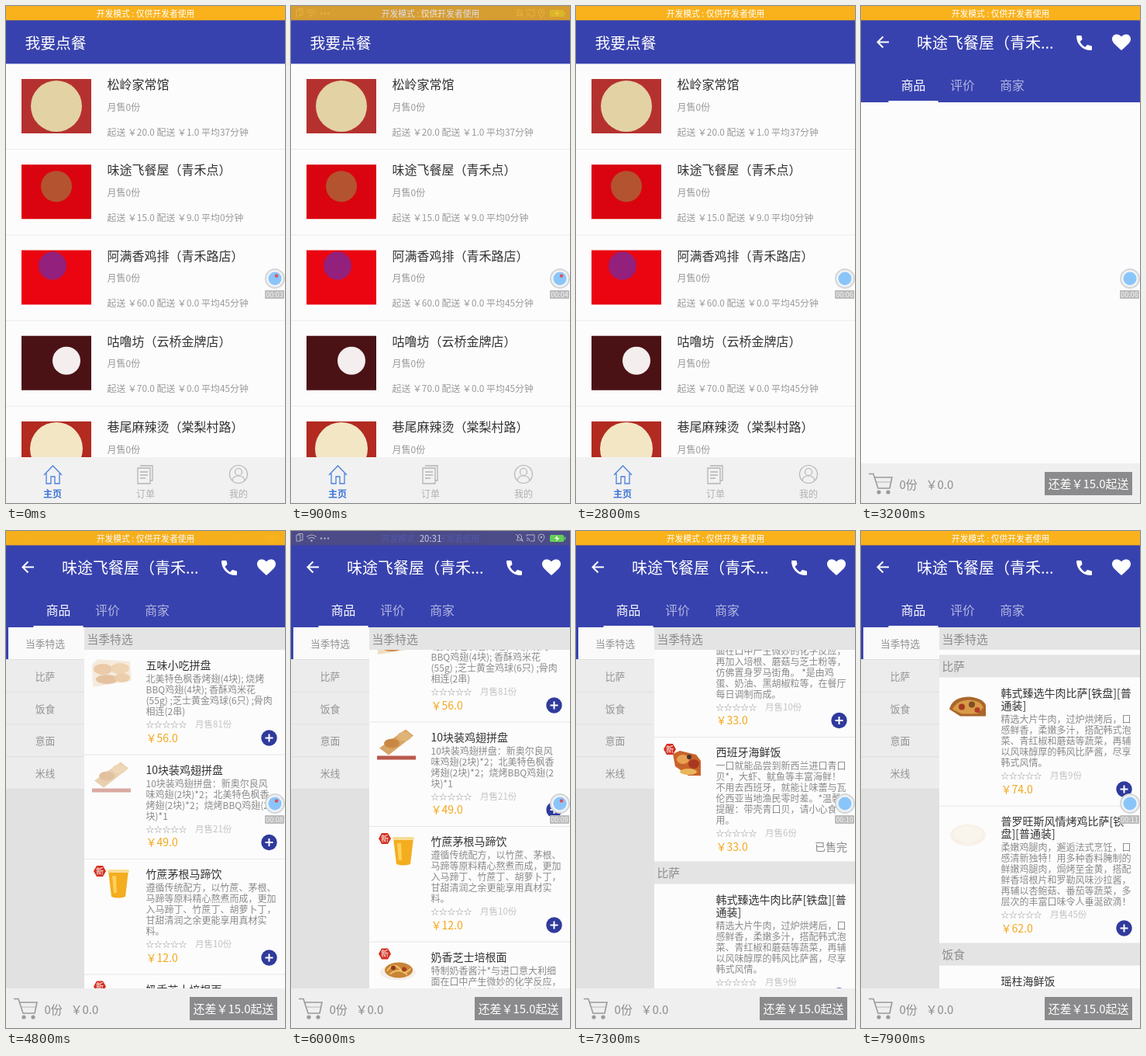
Write an HTML page that moves like this. It is 360 px wide and 640 px high and loops after 8000 ms.

```html
<!DOCTYPE html>
<html lang="zh-CN">
<head>
<meta charset="utf-8">
<style>
html, body { margin: 0; width: 100%; height: 100%; overflow: hidden; background: #fcfcfc; }
svg { display: block; width: 360px; height: 640px; }
text { font-family: "Noto Sans CJK SC", "Noto Sans CJK", "Noto Sans", sans-serif; white-space: pre; }
svg { font-weight: 350; }
</style>
</head>
<body>
<svg id="stage" viewBox="0 0 360 640"></svg>
<script>
const BLUE = '#3842ae', DARK = '#2f3a9c', ORANGE = '#f9b21b', PRICE = '#f3a71c';
const BAR = 18.4;

const rect = (x, y, w, h, fill, more = '') =>
  `<rect x="${x}" y="${y}" width="${w}" height="${h}" fill="${fill}" ${more}/>`;
const circle = (x, y, r, fill, more = '') =>
  `<circle cx="${x}" cy="${y}" r="${r}" fill="${fill}" ${more}/>`;
const oval = (x, y, rx, ry, fill) =>
  `<ellipse cx="${x}" cy="${y}" rx="${rx}" ry="${ry}" fill="${fill}"/>`;
const path = (d, fill, more = '') => `<path d="${d}" fill="${fill}" ${more}/>`;
const line = (d, color, w = 1) => path(d, 'none', `stroke="${color}" stroke-width="${w}"`);
// Text is placed by its left edge and vertical centre.
const text = (x, cy, size, str, fill, more = '') =>
  `<text x="${x}" y="${cy + size * .38}" font-size="${size}" fill="${fill}" ${more}>${str}</text>`;
const mid = (x, cy, size, str, fill, more = '') =>
  text(x, cy, size, str, fill, 'text-anchor="middle" ' + more);
const group = (id, body, more = '') => `<g id="${id}" ${more}>${body}</g>`;

// ---------- shop list ----------
// Name, minimum, fee, minutes, sign colour, then the plain mark: x, y, radius, colour.
const shops = [
  ['松岭家常馆', '20.0', '1.0', 37, '#b5312f', 45, 35, 33, '#e3d2a4'],
  ['味途飞餐屋（青禾点）', '15.0', '9.0', 0, '#d9040f', 45, 28, 20, '#b4532f'],
  ['阿满香鸡排（青禾路店）', '60.0', '0.0', 45, '#ea0510', 40, 20, 18, '#93207c'],
  ['咕噜坊（云桥金牌店）', '70.0', '0.0', 45, '#4b1216', 58, 32, 18, '#f4eeee'],
  ['巷尾麻辣烫（棠梨村路）', '20.0', '0.0', 45, '#b22a20', 45, 35, 34, '#f3e6c4'],
];

function shopRow([name, min, fee, mins, sign, x, cy, r, mark], i) {
  const y = 74 + i * 110.25;
  return rect(20, y + 20, 90, 70, sign) + circle(20 + x, y + 20 + cy, r, mark) +
    text(130.5, y + 27, 16, name, '#333') +
    text(130.5, y + 56, 12, '月售0份', '#999') +
    text(130.5, y + 88, 11.9, `起送 ￥${min} 配送 ￥${fee} 平均${mins}分钟`, '#999') +
    rect(0, y + 110, 360, 1, '#ebebeb');
}

const tabIcons =
  line('M49 604L60.5 592L72 604M52 602V615H58V606H63V615H69V602', '#4a80dd', 1.3) +
  line('M173 592H189V611H186M170 595H186V615H170ZM173 600H183M173 604H183M173 608H180', '#b4b4b4', 1.3) +
  circle(300, 603, 11.5, 'none', 'stroke="#b4b4b4" stroke-width="1.2"') +
  circle(300, 600, 4.5, 'none', 'stroke="#b4b4b4" stroke-width="1.2"') +
  line('M292 611Q293 605 300 605Q307 605 308 611', '#b4b4b4', 1.2);

const home = rect(0, 0, 360, 640, '#fcfcfc') + shops.map(shopRow).join('') +
  rect(0, 0, 360, BAR + 56, BLUE) + text(24.5, 47, 19.8, '我要点餐', '#fff') +
  rect(0, 581, 360, 59, '#f1f1f1') + tabIcons +
  mid(60, 628.5, 12, '主页', '#3c74d8', 'font-weight="700"') +
  mid(180, 628.5, 12, '订单', '#b0b0b0') + mid(300, 628.5, 12, '我的', '#b0b0b0');

// ---------- menu ----------
// Food pictures, drawn relative to the title line of a dish.
const noodles = (x, y) => oval(x, y, 23, 10, '#f3eee8') + oval(x + 1, y - 3, 18, 10, '#c88437') +
  line(`M${x - 14} ${y - 2}q8 -12 16 -3t14 0M${x - 10} ${y + 2}q10 -9 22 1`, '#f0c169', 2) +
  circle(x - 6, y - 6, 3, '#8f3a1e') + circle(x + 8, y - 4, 3, '#a3421f');
const photos = [
  path('M111 -1L118 -8L160 -5L162 20L112 28Z', '#f0dcc0') + oval(125, 5, 12, 7, '#d99a58') +
    oval(147, 4, 12, 7, '#e2ae6c') + oval(130, 18, 14, 6, '#cf8747') + oval(150, 16, 10, 6, '#dea25e'),
  path('M114 14L148 -10L158 -2L126 23Z', '#d8a565') + oval(130, 8, 10, 6, '#c98745') +
    oval(146, -1, 9, 6, '#e0b377') + rect(111, 24, 50, 5, '#b9594b'),
  path('M132 -5H158L154 29Q145 32 136 29Z', '#f4ad1f') + rect(131, -6, 28, 4, '#f8dc94', 'rx="2"') +
    path('M137 2H142L143 24H139Z', '#ffd05a'),
  noodles(138, 20),
  path('M125 2L134 -2L155 3L161 11V30H145L128 18Z', '#c9632c') + oval(138, 9, 8, 6, '#e9a050') +
    oval(152, 15, 7, 6, '#a83820') + oval(145, 25, 11, 4, '#eab65c') + circle(146, 6, 3, '#46352d'),
  path('M114 21Q118 5 140 5Q158 7 161 16V30H128Z', '#a9662b') +
    path('M118 21Q124 9 140 9Q155 10 158 19L150 27H130Z', '#d99a47') +
    circle(130, 18, 4, '#a53822') + circle(143, 15, 4, '#7d4d24') + circle(150, 22, 3.5, '#b33c25'),
  oval(138, 18, 23, 14, '#d09a55') + oval(138, 17, 18, 10, '#e7bc72'),
  '',
];
const badge = path('M113 -4L117 -11H125L129 -4L125 3H117Z', '#d32f20') +
  mid(121, -4, 10, '新', '#fff');

const dishes = [
  ['五味小吃拼盘', '北美特色枫香烤翅(4块); 烧烤|BBQ鸡翅(4块); 香酥鸡米花|(55g) ;芝士黄金鸡球(6只) ;骨肉|相连(2串)', 81, '56.0'],
  ['10块装鸡翅拼盘', '10块装鸡翅拼盘：新奥尔良风|味鸡翅(2块)*2；北美特色枫香|烤翅(2块)*2；烧烤BBQ鸡翅(2|块)*1', 21, '49.0'],
  ['竹蔗茅根马蹄饮', '遵循传统配方，以竹蔗、茅根、|马蹄等原料精心熬煮而成，更加|入马蹄丁、竹蔗丁、胡萝卜丁，|甘甜清润之余更能享用真材实|料。', 10, '12.0', 'new'],
  ['奶香芝士培根面', '特制奶香酱汁*与进口意大利细|面在口中产生微妙的化学反应，|再加入培根、蘑菇与芝士粉等，|仿佛置身罗马街角。 *是由鸡|蛋、奶油、黑胡椒粒等，在餐厅|每日调制而成。', 10, '33.0', 'new'],
  ['西班牙海鲜饭', '一口就能品尝到新西兰进口青口|贝*，大虾、鱿鱼等丰富海鲜！|不用去西班牙，就能让味蕾与瓦|伦西亚当地渔民零时差。*温馨|提醒：带壳青口贝，请小心食|用。', 6, '33.0', 'new sold', '比萨'],
  ['韩式臻选牛肉比萨[铁盘][普|通装]', '精选大片牛肉，过炉烘烤后，口|感鲜香，柔嫩多汁，搭配韩式泡|菜、青红椒和蘑菇等蔬菜，再辅|以风味醇厚的韩风比萨酱，尽享|韩式风情。', 9, '74.0'],
  ['普罗旺斯风情烤鸡比萨[铁|盘][普通装]', '柔嫩鸡腿肉，邂逅法式烹饪，口|感清新独特！用多种香料腌制的|鲜嫩鸡腿肉，焗烤至金黄，搭配|鲜香培根片和罗勒风味沙拉酱，|再辅以杏鲍菇、番茄等蔬菜，多|层次的丰富口味令人垂涎欲滴！', 45, '62.0', '', '饭食'],
  ['瑶柱海鲜饭', '', 12, '35.0'],
];

const section = (y, name) => rect(101, y, 259, 29, '#e4e4e4') + text(104.5, y + 15, 14.8, name, '#8c8c8c');

function dishList() {
  let y = 173, out = '';
  dishes.forEach(([title, desc, sales, price, flags = '', next], i) => {
    out += group('photo' + i, photos[i], `transform="translate(0 ${y})"`);
    if (flags.includes('new')) out += `<g transform="translate(0 ${y})">${badge}</g>`;
    title.split('|').forEach((s, k) => {
      if (k) y += 16.5;
      out += text(180.5, y, 14, s, '#333');
    });
    y += 3.5;
    for (const s of desc.split('|')) out += text(180.5, y += 14, 12, s, '#8a8a8a');
    y += 16.5;
    out += text(180.5, y, 10.6, '☆☆☆☆☆', '#999') + text(244, y, 11.5, `月售${sales}份`, '#c4c4c4');
    y += 17.5;
    out += text(180.5, y, 14, '￥' + price, PRICE, 'font-weight="500"');
    out += flags.includes('sold') ? text(308, y, 14, '已售完', '#8c8c8c')
      : circle(339.5, y, 10.2, DARK) + line(`M334.5 ${y}h10M339.5 ${y - 5}v10`, '#fff', 2);
    if (next) {
      out += section(y += 19, next);
      y += 49;
    } else {
      out += rect(101, y + 21, 259, 1, '#e8e8e8');
      y += 41;
    }
  });
  return out;
}

const sidebar = rect(0, 124, 101, 465, '#e1e1e1') + rect(0, 124, 101, 208, '#ececec') +
  rect(3, 124, 98, 41, '#fafafa') + rect(0, 124, 3, 41, BLUE) +
  ['当季特选', '比萨', '饭食', '意面', '米线'].map((s, i) =>
    mid(50.5, 145.5 + i * 41.7, 12.8, s, '#949494') +
    rect(0, 165 + i * 41.7, 101, 1, '#dfdfdf')).join('');

const cart = line('M10 602.5H16L22 621H37L40 607H18', '#9a9a9a', 1.6) +
  line('M20 613H38', '#b4b4b4') + circle(23, 626, 2.6, '#9a9a9a') + circle(35, 626, 2.6, '#9a9a9a');

const menuBody = `<g clip-path="url(#listArea)">${group('list', dishList())}</g>` +
  section(124, '当季特选') + sidebar;

const menu = rect(0, 0, 360, 640, '#fcfcfc') + group('menuBody', menuBody) +
  rect(0, 0, 360, 124, BLUE) +
  line('M36 46.5H22M28.5 39.5L21.5 46.5L28.5 53.5', '#fff', 2) +
  text(72, 47, 20, '味途飞餐屋（青禾...', '#fff') +
  path('M279 38H283.5Q284.5 38 284.7 39L285.5 43L282.5 46Q285 50.5 289 53L292 50L297 51.2Q298 51.5 298 52.5V56Q298 57 297 57Q288 57 283 51.5Q278 46 278 39Q278 38 279 38Z', '#fff') +
  path('M336 57L333 54.5C327 49 324 46.5 324 42.5C324 36 332 34.5 336 39.5C340 34.5 348 36 348 42.5C348 46.5 345 49 339 54.5Z', '#fff') +
  mid(67.5, 101.5, 15.8, '商品', '#fff', 'font-weight="500"') +
  mid(131, 101.5, 15.8, '评价', '#b1b6e0') + mid(195, 101.5, 15.8, '商家', '#b1b6e0') +
  rect(35.5, 122, 64, 2, '#fff') +
  rect(0, 589, 360, 51, '#efeff0') + cart +
  text(49.5, 616, 15, '0份', '#8c8c8c') + text(83.5, 616, 15, '￥0.0', '#8c8c8c') +
  rect(237, 600, 113, 30, '#8b8b8d') + mid(293.5, 615.5, 15, '还差￥15.0起送', '#fff');

// ---------- system overlays ----------
const PALE = '#a9afdc';
const status = rect(0, 0, 360, BAR, DARK) +
  line('M7 5H12V13H7ZM9.5 5V3.5H15V12H12', PALE) +
  line('M20.5 7.5Q26.5 2.5 32.5 7.5M22.5 10Q26.5 6.5 30.5 10', PALE, 1.2) + circle(26.5, 12.5, 1.3, PALE) +
  [39, 43.5, 48].map(x => circle(x, 9.5, 1.2, PALE)).join('') +
  mid(180, 10, 11.5, '20:31', '#c6cae8') +
  line('M291 12H299L297.5 10V7Q297 4.5 295 4.5Q293 4.5 292.5 7V10ZM290 4L300 14', PALE) +
  line('M304 7V5H314V13H309M304 9Q308 9 308 13M304 11.5Q305.5 11.5 305.5 13', PALE) +
  line('M323 14.5Q319 10 319 8A4 4 0 0 1 327 8Q327 10 323 14.5Z', PALE) + circle(323, 8, 1.3, PALE) +
  rect(334, 5, 18, 9, '#48d264', 'rx="1.5"') + rect(352.5, 7.5, 1.8, 4, '#48d264') +
  path('M344 5.5L340 10H343L342 13.5L346.5 9H343.5Z', '#fff') +
  group('banner', rect(0, 0, 360, BAR, ORANGE) + mid(180, 9.8, 10.8, '开发模式 : 仅供开发者使用', '#fff'));

const recorder = circle(347, 351, 12, '#f1f2f4', 'stroke="#d3d6d9" stroke-width="2"') +
  circle(347, 351, 8.5, '#8ac5fa') + group('dot', circle(349, 347.5, 2.2, '#e0505c')) +
  rect(334, 366, 25, 11, '#bdbdbd', 'rx="1"') + mid(346.5, 371.5, 9, '', '#f4f4f4', 'id="clock"');

const $ = id => document.getElementById(id);
$('stage').innerHTML =
  '<defs><clipPath id="listArea"><rect x="101" y="124" width="259" height="465"/></clipPath></defs>' +
  home + group('menu', menu) + status + recorder;

// ---------- motion ----------
const ramp = (t, a, b) => Math.min(1, Math.max(0, (t - a) / (b - a)));
const smooth = p => (1 - Math.cos(Math.PI * p)) / 2;

function follow(keys, t) {
  const i = keys.findIndex(k => k[0] > t);
  if (i < 0) return keys[keys.length - 1][1];
  if (!i) return keys[0][1];
  const [a, u] = keys[i - 1], [b, v] = keys[i];
  return u + (v - u) * (t - a) / (b - a);
}
const scrollKeys = [[5700, 0], [6200, 70], [6700, 181], [7000, 330], [7300, 468], [7500, 525], [7600, 560], [7900, 734]];
const dotTimes = [[0, 200], [800, 1500], [1800, 2600], [4800, 5300], [5800, 6800]];
const fades = { photo0: [4300, 5300], photo1: [4300, 5300], photo5: [7300, 7600], photo6: [7850, 8350] };

function draw(t) {
  const beat = t % 4000;
  const move = (id, x, y) => $(id).setAttribute('transform', `translate(${x} ${y})`);
  const fade = (id, a) => $(id).setAttribute('opacity', a);
  fade('banner', 1 - smooth(ramp(beat, 750, 1300)) + smooth(ramp(beat, 1800, 2600)));
  fade('dot', dotTimes.some(([a, b]) => t >= a && t < b) ? 1 : 0);
  $('clock').textContent = '00:' + String(Math.floor((t + 3200) / 1000)).padStart(2, '0');
  move('menu', 360 * (1 - ramp(t, 2800, 3200)) ** 2, 0);
  fade('menuBody', ramp(t, 3600, 3900));
  move('list', 0, -follow(scrollKeys, t));
  for (const id in fades) fade(id, ramp(t, ...fades[id]));
}

const start = performance.now();
function tick() {
  draw(Math.floor((performance.now() - start) % 8000 / 100) * 100);
  requestAnimationFrame(tick);
}
tick();
</script>
</body>
</html>
```
